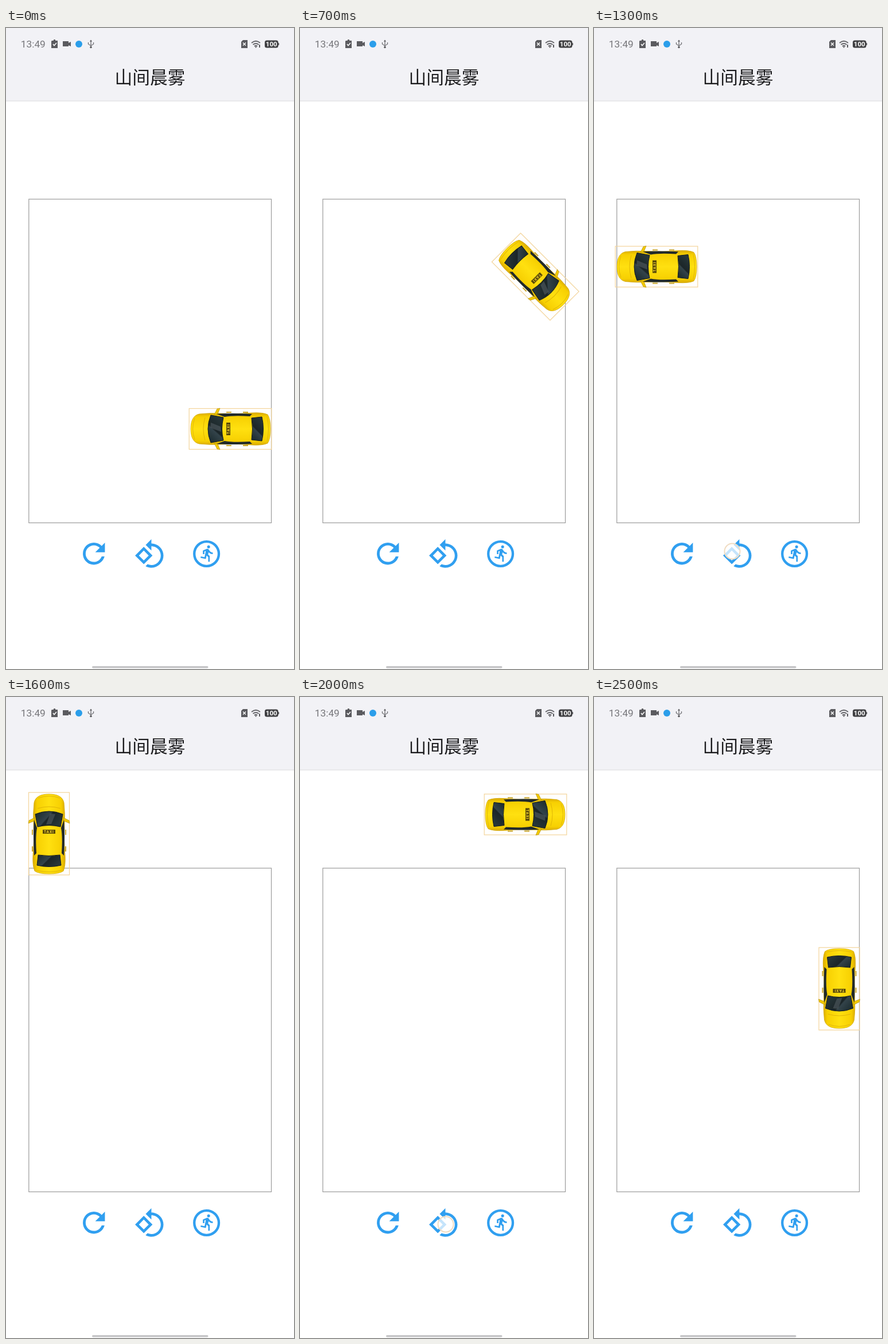
An HTML page that plays this animation: 502 px wide and 1116 px high, repeating every 2600 ms.

```html
<!DOCTYPE html>
<html lang="zh">
<head>
<meta charset="utf-8">
<style>
  html, body { margin: 0; width: 100%; height: 100%; overflow: hidden; background: #fff; }
  svg { display: block; width: 502px; height: 1116px; }
  text { text-anchor: middle; }
  .ui { font-family: Roboto, Inter, sans-serif; }
</style>
</head>
<body>
<svg viewBox="0 0 502 1116">
  <defs>
    <linearGradient id="paint">
      <stop offset="0" stop-color="#d9a900"/>
      <stop offset=".13" stop-color="#f7d002"/>
      <stop offset=".5" stop-color="#ffe010"/>
      <stop offset=".87" stop-color="#f7d002"/>
      <stop offset="1" stop-color="#d9a900"/>
    </linearGradient>
    <linearGradient id="glass" x2="1" y2=".5">
      <stop offset="0" stop-color="#17272a"/>
      <stop offset=".5" stop-color="#33434a"/>
      <stop offset=".55" stop-color="#1b2528"/>
      <stop offset="1" stop-color="#263538"/>
    </linearGradient>
    <g id="side">
      <path d="M25-28L35-23 36-18 26-22Z" fill="#f2c800" stroke="#a88a10" stroke-width=".6"/>
      <path d="M28-7h2v9h-2zM28 22h2v9h-2z" fill="#c8a52a"/>
      <path d="M26-24Q28 0 26 38L22 34Q24 5 21-10Z" fill="#20292a"/>
    </g>
  </defs>

  <!-- header and status bar -->
  <rect width="502" height="127" fill="#f2f2f6"/>
  <path d="M0 127h502" stroke="#e3e3e6" stroke-width="1.5"/>
  <text class="ui" x="47.3" y="34" font-size="17.3" fill="#77777b">13:49</text>
  <g fill="#5b5b5f">
    <path d="M80 22h2.5l1-2h2l1 2H90v13H79V23z"/>
    <path d="M82 28l2 2.5 4-4.5" fill="none" stroke="#fff" stroke-width="1.5"/>
    <path d="M99 23h10v3l4-2v8l-4-2v2H99z"/>
    <path d="M148 22v12M143.500 25v3l4.500 3 4.500-3v-3" fill="none" stroke="#77777b" stroke-width="1.400"/>
    <path d="M145.800 23.500l2.200-3 2.200 3z"/>
    <circle cx="148" cy="33.500" r="1.800"/>
    <path d="M413 21h8v14h-11V24z"/>
    <path d="M413 25.500l5 5m0-5l-5 5" stroke="#fff" stroke-width="1.400"/>
    <path d="M428 26q7.500-6.500 15 0M430.500 29q5-4 10 0M433 31.800q2.500-2 5 0" fill="none" stroke="#66666a" stroke-width="1.800"/>
    <path d="M433.500 32.500h4l-2 2.200zM441 29h2v5h-2z"/>
    <rect x="451" y="21.500" width="23.500" height="13" rx="3.500" fill="#404043"/>
    <path d="M475.200 26v4" stroke="#404043" stroke-width="1.500"/>
  </g>
  <text class="ui" x="462.700" y="32.200" font-size="11.500" font-weight="700" fill="#fff">100</text>
  <circle cx="127" cy="28" r="6" fill="#2b9eea"/>
  <text x="251" y="97" font-size="30.700" fill="#1c1c1e" font-family="'Noto Sans CJK SC','Noto Sans CJK',sans-serif">山间晨雾</text>

  <rect x="39.800" y="298" width="422.700" height="563.500" fill="none" stroke="#9b9b9b" stroke-width="1.200"/>

  <!-- buttons -->
  <g fill="#309ff0">
    <path transform="translate(124.400 886.400) scale(2.400)" d="M17.65 6.35C16.2 4.9 14.21 4 12 4c-4.42 0-7.99 3.58-7.99 8s3.57 8 7.99 8c3.73 0 6.84-2.55 7.73-6h-2.08c-.82 2.33-3.04 4-5.65 4-3.31 0-6-2.69-6-6s2.69-6 6-6c1.66 0 3.14.69 4.22 1.78L13 11h7V4z"/>
    <path transform="translate(223 888.200) scale(2.340)" d="M7.34 6.41L.86 12.9l6.49 6.48 6.49-6.48zM3.69 12.9l3.66-3.66L11 12.9l-3.66 3.66zm15.67-6.26C17.61 4.88 15.3 4 13 4V.76L8.76 5 13 9.24V6c1.79 0 3.58.68 4.95 2.05 2.73 2.73 2.73 7.17 0 9.9C16.58 19.32 14.79 20 13 20c-.97 0-1.94-.21-2.84-.61l-1.49 1.49C10.02 21.62 11.51 22 13 22c2.3 0 4.61-.88 6.36-2.64 3.52-3.51 3.52-9.21 0-12.72z"/>
    <circle cx="349.600" cy="915.500" r="21.400" fill="none" stroke="#309ff0" stroke-width="4.300"/>
    <path transform="translate(335.200 898.700) scale(1.330)" d="M13.49 5.48c1.1 0 2-.9 2-2s-.9-2-2-2-2 .9-2 2 .9 2 2 2zm-3.6 13.9l1-4.4 2.1 2v6h2v-7.5l-2.1-2 .6-3c1.3 1.5 3.3 2.5 5.5 2.5v-2c-1.9 0-3.5-1-4.3-2.4l-1-1.6c-.4-.6-1-1-1.7-1-.3 0-.5.1-.8.1l-5.2 2.2v4.7h2v-3.4l1.8-.7-1.6 8.1-4.9-1-.4 2z"/>
  </g>
  <circle id="tap" r="13.500" fill="#fff" fill-opacity=".72" stroke="#f0dcc2" stroke-width="2"/>
  <rect x="150" y="1111" width="202.500" height="3.500" rx="1.700" fill="#c5c5c7"/>

  <!-- taxi, nose up, centred on its own origin -->
  <g id="car">
    <rect x="-35.500" y="-71.800" width="71" height="143.600" fill="none" stroke="#f3d49a" stroke-width="1.200"/>
    <path d="M0-69C15-69 24-64 26-54Q28-35 27-20Q25 10 28 38Q29 56 25 65Q18 70 0 70Q-18 70-25 65Q-29 56-28 38Q-25 10-27-20Q-28-35-26-54C-24-64-15-69 0-69Z" fill="url(#paint)" stroke="#d2a90e" stroke-width=".8"/>
    <path d="M-19-62Q0-69 19-62M-20-44Q0-50 20-44M-22 64Q0 69 22 64" fill="none" stroke="#e0b606"/>
    <use href="#side"/>
    <use href="#side" transform="scale(-1 1)"/>
    <path d="M-24-34Q0-44 24-34L20-12Q0-17-20-12Z" fill="url(#glass)" stroke="#161d1e"/>
    <path d="M2-35L11-34 4-17-5-16Z" fill="#5b666c" opacity=".5"/>
    <path d="M-19 37Q0 40 19 37L21 55Q0 60-21 55Z" fill="url(#glass)" stroke="#161d1e"/>
    <rect x="-11" y="-7" width="22" height="7" fill="#5a4a08"/>
    <text class="ui" y="-1.200" font-size="6.500" font-weight="700" letter-spacing="1" fill="#f0cf30">TAXI</text>
  </g>
</svg>
<script>
  const LOOP = 2600, STEP = 100;
  // time, centre x, centre y, heading in degrees
  const path = [
    [0, 391, 698, -90], [100, 356.5, 732, 0], [400, 356.5, 517.5, 0], [500, 356.5, 450, 0],
    [600, 393, 415.5, 90], [800, 427.5, 450.5, 180], [900, 391, 415.5, 270], [1000, 391, 415.5, 270],
    [1300, 109, 415.5, 270], [1400, 88, 437, 325], [1500, 75, 345, 360], [1600, 75, 238, 360],
    [1700, 110, 204.5, 450], [1800, 180, 204.5, 450], [2000, 393, 204.5, 450],
    [2100, 423, 234, 525], [2200, 427.5, 310, 540], [2500, 427.5, 508, 540]
  ];
  const run = [349, 905], turn = [241, 911];
  const taps = {
    200: run, 400: run, 600: turn, 800: turn, 1100: run, 1300: turn,
    1500: run, 1700: turn, 1900: run, 2000: [254, 918], 2200: run, 2400: run
  };
  const car = document.getElementById('car');
  const tap = document.getElementById('tap');

  function pose(t) {
    const i = path.findIndex(k => k[0] >= t);
    const b = path[i], a = path[Math.max(0, i - 1)];
    const f = (t - a[0]) / (b[0] - a[0] || 1);
    return a.map((v, j) => v + (b[j] - v) * f);
  }

  function draw() {
    const t = Math.floor(performance.now() % LOOP / STEP) * STEP;
    const [, x, y, heading] = pose(t);
    car.setAttribute('transform', `translate(${x} ${y}) rotate(${heading})`);
    const at = taps[t];
    tap.style.display = at ? '' : 'none';
    if (at) tap.setAttribute('transform', `translate(${at})`);
    requestAnimationFrame(draw);
  }
  draw();
</script>
</body>
</html>
```
